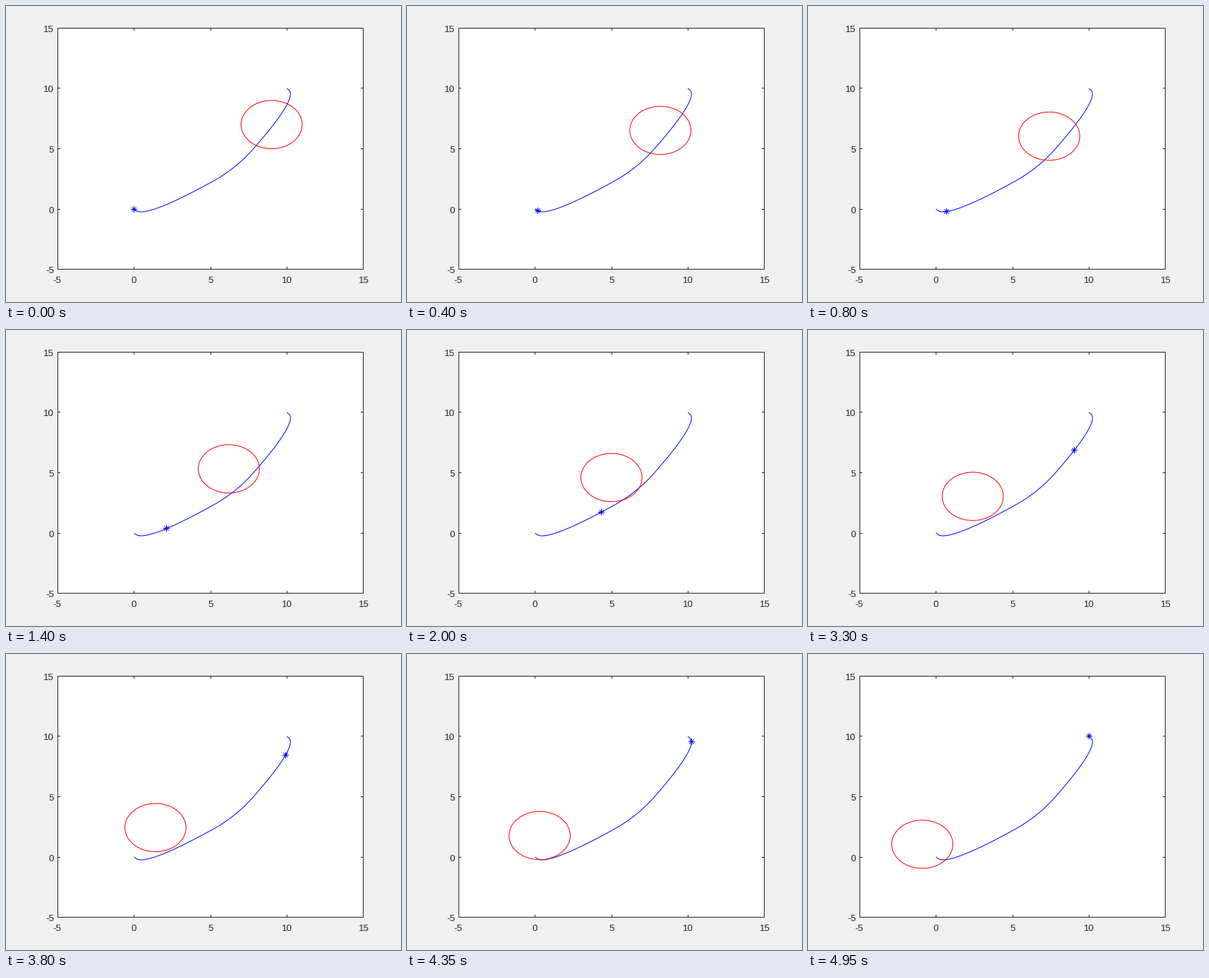
Recreate the animation shown at these times as a matplotlib script. Size 560x420 px, loop 5000 ms.

```python
import numpy as np
import matplotlib.pyplot as plt
from matplotlib.animation import FuncAnimation
from matplotlib.patches import Rectangle

W, H, DPI = 560, 420, 100
FRAMES, INTERVAL = 100, 50
PX = 72 / DPI  # points per pixel

INK = (0.15, 0.15, 0.15)
LEFT, RIGHT, TOP, BOTTOM = 73.5, 506.5, 31.5, 373.5
X_TICKS = [181.5, 290.5, 398.5]
Y_TICKS = [288.5, 202.5, 116.5]
TICK = 3.5

DURATION = 5.0
T_REV = 0.327  # length of the short counter-thrust
ACCEL = 10 / (6.25 - 5 * T_REV)


def to_px(x, y):
    return 73.2 + (x + 5) * 21.67, 373.65 - (y + 5) * 17.115


def dodge(t):
    """Rest-to-rest motion 0..10: thrust back, forward, then brake."""
    back = -t**2
    forward = -2 * T_REV**2 + (t - 2 * T_REV)**2
    brake = 20 / ACCEL - (DURATION - t)**2
    leg = np.where(t < T_REV, back,
                   np.where(t < DURATION / 2 + T_REV, forward, brake))
    return ACCEL / 2 * leg


def position(t):
    return to_px(10 - dodge(DURATION - t), dodge(t))


def obstacle(t):
    a = np.linspace(0, 2 * np.pi, 181)
    return to_px(9 - 2 * t + 2 * np.cos(a), 7 - 1.2 * t + 2 * np.sin(a))


def star(t):
    x, y = (np.floor(v) + 0.5 for v in position(t))
    d, r, gap = 3, 4.5, np.nan
    dx = np.array([-r, r, gap, 0, 0, gap, -d, d, gap, -d, d])
    dy = np.array([0, 0, gap, -r, r, gap, -d, d, gap, d, -d])
    return x + dx, y + dy


fig = plt.figure(figsize=(W / DPI, H / DPI), dpi=DPI, facecolor=(0.94,) * 3)
ax = fig.add_axes([0, 0, 1, 1])
ax.set_xlim(0, W)
ax.set_ylim(H, 0)
ax.axis("off")


def line(xs, ys, color, **kw):
    return ax.plot(xs, ys, color=color, lw=PX, solid_capstyle="butt",
                   snap=False, **kw)[0]


def label(x, y, text, ha):
    ax.text(x, y, text, ha=ha, va="baseline", color=INK,
            family="Liberation Sans", fontsize=13.33 * PX)


# Plot box, ticks and labels
ax.add_patch(Rectangle((LEFT, TOP), RIGHT - LEFT, BOTTOM - TOP,
                       fc="white", ec="none", zorder=0))
line([LEFT, RIGHT, RIGHT, LEFT, LEFT], [TOP, TOP, BOTTOM, BOTTOM, TOP], INK,
     solid_joinstyle="miter")
for x in X_TICKS:
    line([x, x], [TOP, TOP + TICK], INK)
    line([x, x], [BOTTOM, BOTTOM - TICK], INK)
for y in Y_TICKS:
    line([LEFT, LEFT + TICK], [y, y], INK)
    line([RIGHT, RIGHT - TICK], [y, y], INK)
for value, x in zip(range(-5, 16, 5), [LEFT - 1, *X_TICKS, RIGHT + 0.5]):
    text = str(value)
    label(x, 393, text, "center")
    label(68, np.ceil(to_px(0, value)[1]) + 5, text, "right")

# Path and moving parts
line(*position(np.linspace(0, DURATION, 301)), "blue")
marker = line(*star(0.0), "blue")
ring = line(*obstacle(0.0), "red")


def update(i):
    t = i * INTERVAL / 1000
    marker.set_data(*star(t))
    ring.set_data(*obstacle(t))
    return marker, ring


anim = FuncAnimation(fig, update, frames=FRAMES, interval=INTERVAL,
                     repeat=True, repeat_delay=0, blit=False)
plt.show()
```
